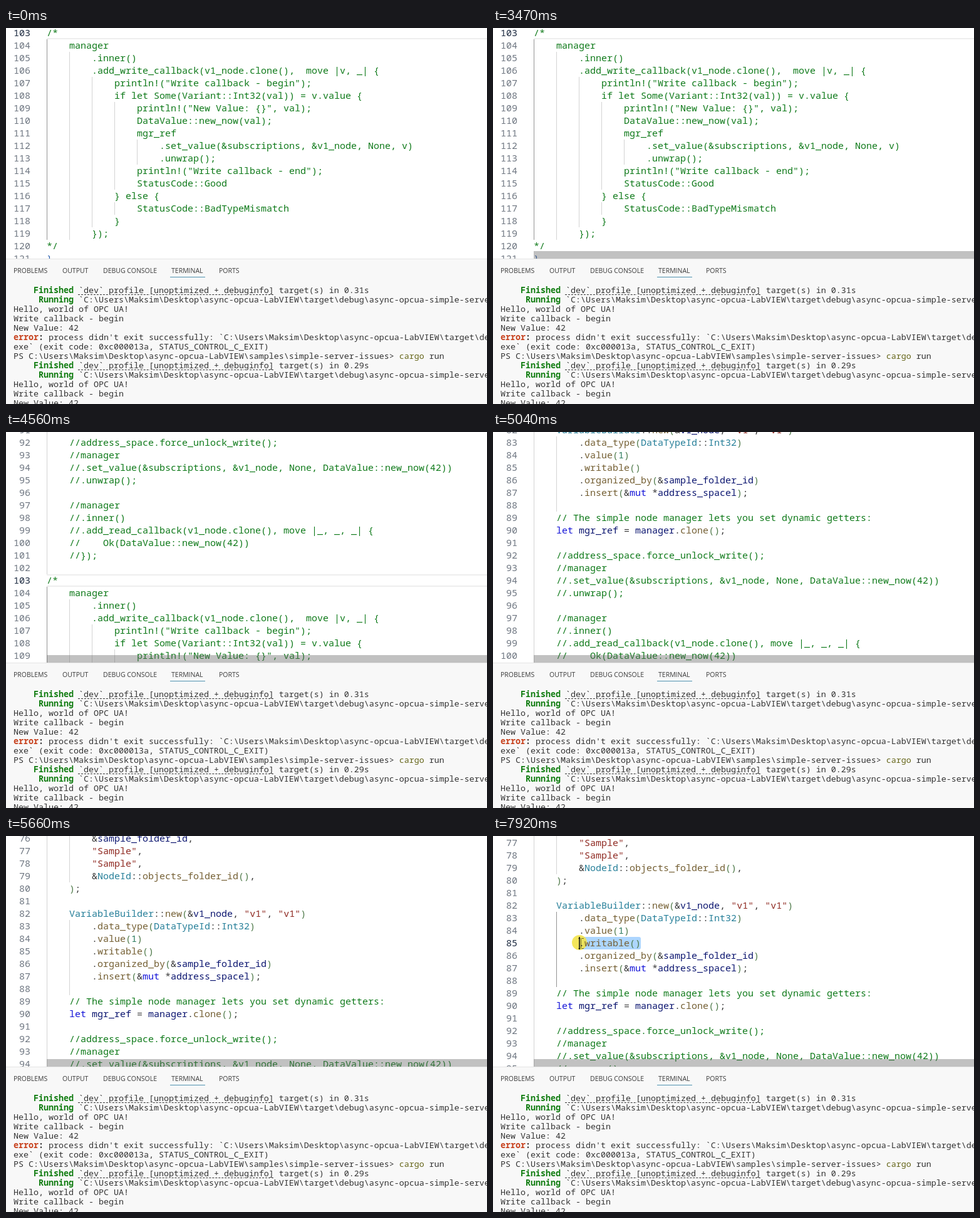
These frames come from a looping animation (768 px wide and 600 px high, 8 s). An HTML page:

```html
<!DOCTYPE html>
<html lang="en">
<head>
<meta charset="utf-8">
<title>Editor and terminal</title>
<style>
  html, body { margin: 0; width: 100%; height: 100%; overflow: hidden; background: #fff; }
  #stage { position: relative; width: 768px; height: 600px; overflow: hidden; }
  #stage div, #stage span.tab, #stage svg { position: absolute; }
  #editor { left: 0; top: 0; width: 768px; height: 368px; overflow: hidden; background: #fff; }
  #code { left: 0; top: 0; width: 768px; font: 300 15px/20px "Noto Sans Mono", "DejaVu Sans Mono", monospace; color: #3b3b3b; }
  .row, .num { margin-top: -1px; }
  .row { left: 65px; height: 20px; white-space: pre; font-variant-ligatures: none; }
  .num { left: 0; width: 39px; text-align: right; color: #6e7681; }
  .guide { width: 1px; height: 20px; background: #d3d3d3; }
  #code.idle .on103, #code.picked .on85 { background: #939393; }
  #code.idle .num103, #code.picked .num85 { color: #1c2a40; }
  #line { left: 65px; width: 720px; height: 20px; box-sizing: border-box; border: 2px solid #eee; border-left: 0; }
  #pick { height: 20px; background: #add6ff; border-radius: 3px; }
  #caret { width: 2px; height: 20px; background: #3a3a20; }
  #ring { width: 24px; height: 24px; border-radius: 50%; background: rgba(242, 226, 70, .88); }
  .fold { left: 49px; }
  #bar { left: 65px; top: 356px; width: 703px; height: 12px; background: rgba(100, 100, 100, .4); }
  .comment { color: #0f7a1a; }
  .string { color: #8f2a22; }
  .key { color: #1414d8; }
  .type { color: #267f99; }
  .call { color: #745f33; }
  .digit { color: #2a7a5c; }
  .name { color: #0c1670; }
  .paren { color: #4f7a4a; }
  .brace { color: #2a5fae; }
  #panel { left: 0; top: 368px; width: 768px; height: 232px; box-sizing: border-box; border-top: 1px solid #e5e5e5; background: #f8f8f8; color: #3b3b3b; }
  .tab { top: 10px; font: 10.5px/16px "Open Sans", "Noto Sans", sans-serif; white-space: pre; }
  #mark { left: 262px; top: 28px; width: 56px; height: 1px; background: #4f93b0; }
  #panel pre { position: absolute; left: 12px; top: 42px; margin: 0; font: 300 13.3333px/15px "Noto Sans Mono", "DejaVu Sans Mono", monospace; color: #333; font-variant-ligatures: none; }
  #panel b { font-weight: 700; color: #107c10; }
  #panel b.bad { color: #c7401c; }
  #panel b.dark { color: #333; }
  #panel u { text-decoration: underline dashed 1px; text-underline-offset: 2px; }
  #panel i { font-style: normal; color: #66661a; }
</style>
</head>
<body>
<div id="stage">
  <div id="editor">
    <div id="code" class="idle">
      <div id="line"></div>
      <div id="pick"></div>
      <div id="ring"></div>
      <div id="caret"></div>
    </div>
    <div id="bar"></div>
  </div>
  <div id="panel">
    <span class="tab" style="left:12px">PROBLEMS</span>
    <span class="tab" style="left:90px">OUTPUT</span>
    <span class="tab" style="left:155px">DEBUG CONSOLE</span>
    <span class="tab" style="left:264px">TERMINAL</span>
    <span class="tab" style="left:340px">PORTS</span>
    <div id="mark"></div>
<pre>    <b>Finished</b> <u>`dev` profile [unoptimized + debuginfo]</u> target(s) in 0.31s
     <b>Running</b> `C:\Users\Maksim\Desktop\async-opcua-LabVIEW\target\debug\async-opcua-simple-server-issues.exe`
Hello, world of OPC UA!
Write callback - begin
New Value: 42
<b class="bad">error</b><b class="dark">:</b> process didn't exit successfully: `C:\Users\Maksim\Desktop\async-opcua-LabVIEW\target\debug\
exe` (exit code: 0xc000013a, STATUS_CONTROL_C_EXIT)
PS C:\Users\Maksim\Desktop\async-opcua-LabVIEW\samples\simple-server-issues> <i>cargo</i> run
    <b>Finished</b> <u>`dev` profile [unoptimized + debuginfo]</u> target(s) in 0.29s
     <b>Running</b> `C:\Users\Maksim\Desktop\async-opcua-LabVIEW\target\debug\async-opcua-simple-server-issues.exe`
Hello, world of OPC UA!
Write callback - begin
New Value: 42</pre>
  </div>
  <svg id="mouse" width="11" height="19" viewBox="0 0 11 19" fill="none" stroke="#000">
    <path d="M1 1.5H4.5L5.5 2.5L6.5 1.5H10M5.5 2V17M1 17.5H4.5L5.5 16.5L6.5 17.5H10"/>
  </svg>
</div>
<script>
const FIRST = 76, TOP = 103, ROW = 20, CHAR = 9, LEFT = 65, LOOP = 8000;
const source = `        &sample_folder_id,
        "Sample",
        "Sample",
        &NodeId::objects_folder_id(),
    );

    VariableBuilder::new(&v1_node, "v1", "v1")
        .data_type(DataTypeId::Int32)
        .value(1)
        .writable()
        .organized_by(&sample_folder_id)
        .insert(&mut *address_spacel);

    // The simple node manager lets you set dynamic getters:
    let mgr_ref = manager.clone();

    //address_space.force_unlock_write();
    //manager
    //.set_value(&subscriptions, &v1_node, None, DataValue::new_now(42))
    //.unwrap();

    //manager
    //.inner()
    //.add_read_callback(v1_node.clone(), move |_, _, _| {
    //    Ok(DataValue::new_now(42))
    //});

/*
    manager
        .inner()
        .add_write_callback(v1_node.clone(),  move |v, _| {
            println!("Write callback - begin");
            if let Some(Variant::Int32(val)) = v.value {
                println!("New Value: {}", val);
                DataValue::new_now(val);
                mgr_ref
                    .set_value(&subscriptions, &v1_node, None, v)
                    .unwrap();
                println!("Write callback - end");
                StatusCode::Good
            } else {
                StatusCode::BadTypeMismatch
            }
        });
*/
}`.split("\n");

const $ = id => document.getElementById(id);
const code = $("code"), line = $("line"), pick = $("pick"), ring = $("ring"),
      caret = $("caret"), bar = $("bar"), mouse = $("mouse");
const rowTop = n => (n - TOP) * ROW - 2;

function add(cls, top, text = "", x) {
  const el = document.createElement("div");
  el.className = cls;
  el.style.top = top + "px";
  if (x !== undefined) el.style.left = x + "px";
  el.textContent = text;
  code.append(el);
  return el;
}

const kinds = ["string", "key", "type", "call", "digit", "name", "paren", "brace"];
const token = /("[^"]*")|\b(let|mut)\b|\b([A-Z]\w*)|(\w+)(?=\()|\b(\d+)\b|(\w+)|([()])|([{}])|[^\w"(){}]+/g;

function paint(el, text) {
  for (const m of text.matchAll(token)) {
    const k = kinds.findIndex((_, i) => m[i + 1] !== undefined);
    const span = document.createElement("span");
    if (k >= 0) span.className = kinds[k];
    span.textContent = m[0];
    el.append(span);
  }
}

const depth = s => s === undefined || !s.trim() ? 0 : s.search(/\S/) / 4;

source.forEach((text, i) => {
  const n = FIRST + i, top = rowTop(n);
  const levels = text ? depth(text) : Math.max(depth(source[i - 1]), depth(source[i + 1]));
  for (let d = 0; d < levels; d++) {
    const on = d === 0 && n > 103 && n < 120 ? " on103" : d === 1 && n > 82 && n < 89 ? " on85" : "";
    add("guide" + on, top, "", LEFT + d * 4 * CHAR);
  }
  add("num num" + n, top, n);
  const note = /^\s*\/\//.test(text) || (n >= 103 && n <= 120);
  if (note) add("row comment", top, text);
  else paint(add("row", top), text);
});
code.append(caret);

const folds = [103, 104, 106, 108, 111, 116].map(n => {
  const el = add("fold", rowTop(n) + 7);
  el.innerHTML = '<svg width="10" height="8" fill="none" stroke="#424242"><path d="M1 1.5L5 5.5L9 1.5"/></svg>';
  return el;
});

// Rows of time followed by values
const scroll = [[3820, 0], [4560, 229], [4630, 229], [5040, 409], [5110, 409], [5450, 500],
                [5660, 536], [5730, 536], [5860, 523]];
const foldFade = [[850, 0], [1080, 1], [1970, 1], [2110, .2], [2180, .2], [2320, 0]];
const pointer = [[320, 300, 492], [800, 120, 330], [1080, 84, 60], [1200, 74, 14], [1800, 78, 346],
                 [2110, 75, 337], [2180, 75, 337], [2740, 546, 300],
                 [6060, 487, 123], [6500, 137, 162], [6820, 225, 164], [6950, 237, 169],
                 [7150, 237, 169], [7650, 155, 169], [7850, 140, 171]];

function at(track, t) {
  const i = track.findIndex(k => k[0] > t);
  if (i < 0) return track[track.length - 1].slice(1);
  if (i === 0) return track[0].slice(1);
  const a = track[i - 1], b = track[i], p = (t - a[0]) / (b[0] - a[0]);
  return a.slice(1).map((v, j) => v + (b[j + 1] - v) * p);
}

const show = (el, on) => { el.style.visibility = on ? "visible" : "hidden"; };
function place(el, x, y) {
  el.style.left = x + "px";
  el.style.top = y + "px";
}

function draw(t) {
  const shift = Math.round(at(scroll, t)[0]);
  const [x, y] = at(pointer, t).map(Math.round);
  const pressed = t >= 7000;
  const start = LEFT + 8 * CHAR, end = start + 11 * CHAR;
  const edge = Math.max(start, Math.min(end, start + Math.round((x - start) / CHAR) * CHAR));

  code.style.transform = `translateY(${shift}px)`;
  code.className = pressed ? "picked" : "idle";
  line.style.top = rowTop(pressed ? 85 : 103) + "px";
  show(line, !pressed || edge === end);

  place(pick, edge, rowTop(85));
  pick.style.width = end - edge + "px";
  show(pick, pressed && edge < end);
  place(caret, edge, rowTop(85));
  show(caret, pressed);
  place(ring, x - 14, y - shift - 13);
  show(ring, pressed);

  const fade = at(foldFade, t)[0];
  folds.forEach(el => { el.style.opacity = fade; });
  show(bar, (t >= 740 && t < 3750) || t >= 3890);
  place(mouse, x - 5, y - 9);
  mouse.style.opacity = pressed ? .5 : 1;
  show(mouse, (t >= 320 && t < 2740) || t >= 6060);
}

const begin = performance.now();
function tick() {
  draw((performance.now() - begin) % LOOP);
  requestAnimationFrame(tick);
}
tick();
</script>
</body>
</html>
```
